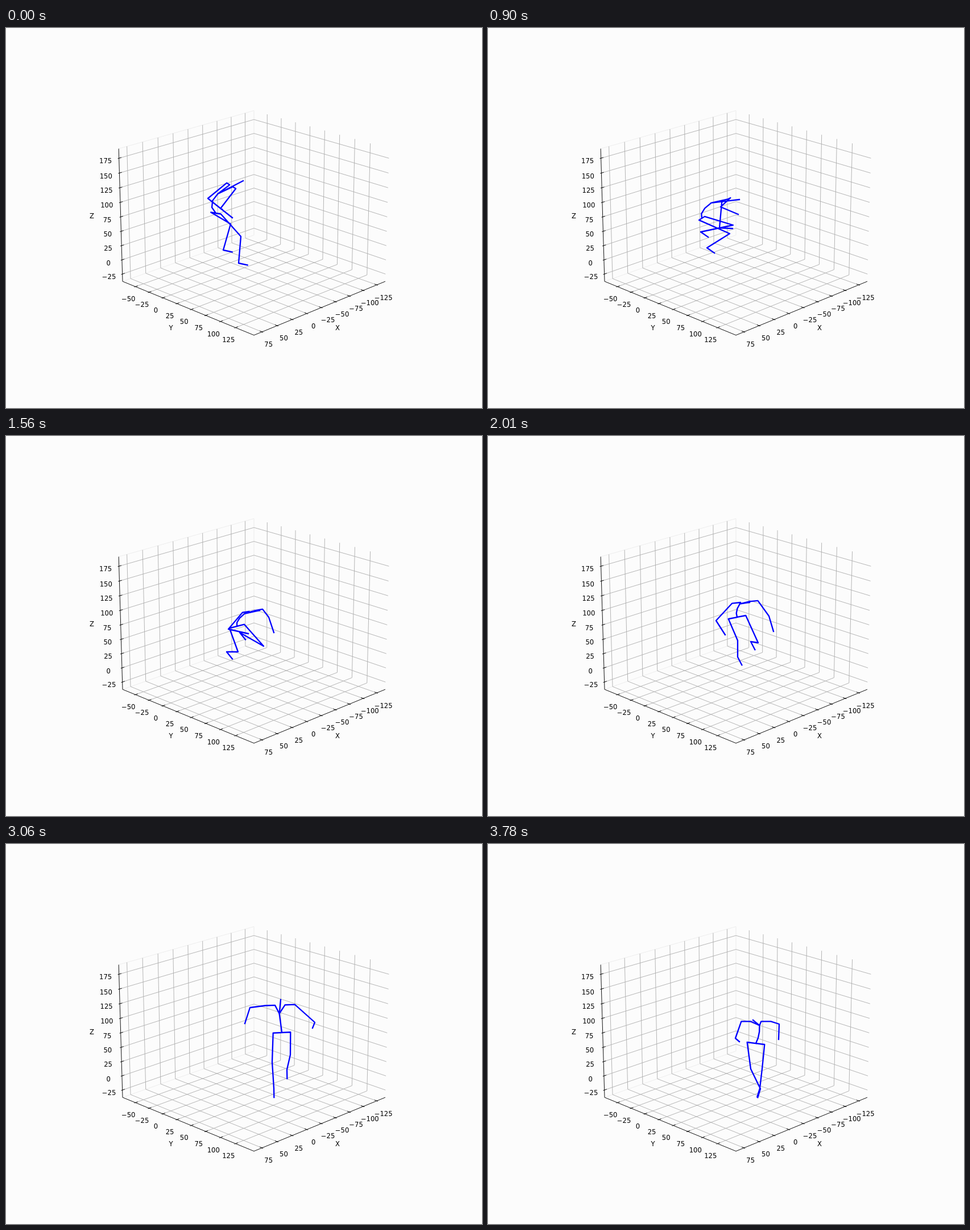
Write an HTML page that moves like this. It is 837 px wide and 669 px high and loops after 3810 ms.

```html
<!DOCTYPE html>
<html>
<head>
<meta charset="utf-8">
<style>
html, body { margin: 0; width: 100%; height: 100%; overflow: hidden; background: #fcfcfc; }
svg { display: block; }
text { font: 11.6px "DejaVu Sans", sans-serif; text-anchor: middle; fill: #000; }
path { fill: none; }
</style>
</head>
<body>
<svg width="837" height="669" viewBox="0 0 837 669">
  <path id="pane" stroke="#ececec" stroke-width="0.93"/>
  <path id="grid" stroke="#b0b0b0" stroke-width="0.93"/>
  <path id="axes" stroke="#000" stroke-width="0.93"/>
  <g id="labels"></g>
  <path id="body" stroke="#0000ff" stroke-width="2.33" stroke-linecap="square" stroke-linejoin="round"/>
</svg>
<script>
const $ = id => document.getElementById(id);
const { sin, cos, PI, min } = Math;
const rad = deg => deg * PI / 180;
const line = pts => "M" + pts.map(p => p[0].toFixed(2) + " " + p[1].toFixed(2)).join("L");

// --- axes box: camera at azimuth 45, elevation 20, distance 10 ---------
const SIDE = 8 / 7, HEIGHT = 6 / 7, ELEV = rad(20), ZOOM = 2900;

// u, v, w run 0..1 along the box edges; u and v lead from the left corner.
function project(u, v, w) {
  const across = (u + v - 1) * SIDE * Math.SQRT1_2;
  const depth = (u - v) * SIDE * Math.SQRT1_2;
  const up = (w - 0.5) * HEIGHT;
  const far = 10 + depth * cos(ELEV) - up * sin(ELEV);
  return [
    436 + ZOOM * across / far,
    331 - ZOOM * (up * cos(ELEV) + depth * sin(ELEV)) / far
  ];
}

const OUT = 0.1 / 12, IN = 0.2 / 12;
let grid = "", labels = "";
let axes = line([project(0, 0, 1), project(0, 0, 0), project(0, 1, 0), project(1, 1, 0)]);

function label(s, x, y) {
  const str = String(s).replace("-", "\u2212");
  labels += `<text x="${x.toFixed(1)}" y="${(y + 4.2).toFixed(1)}">${str}</text>`;
}

// at(f, side): axis point of a tick; mesh(f): its grid line.
function axis(from, to, frac, at, mesh, dx, dy) {
  for (let n = from; n <= to; n += 25) {
    const f = frac(n), [x, y] = at(f, 0);
    grid += line(mesh(f));
    axes += line([at(f, OUT), at(f, -IN)]);
    label(n, x + dx, y + dy);
  }
}
axis(-125, 75, n => (88 - n) / 229, (f, o) => project(f, 1 + o, 0),
  f => [project(f, 1, 0), project(f, 0, 0), project(f, 0, 1)], 11.6, 22);
axis(-50, 125, n => (n + 74) / 229, (f, o) => project(-o, f, 0),
  f => [project(0, f, 0), project(1, f, 0), project(1, f, 1)], -12.4, 21.7);
axis(-25, 175, n => (n + 38) / 229, (f, o) => project(-o, 0, f),
  f => [project(0, 0, f), project(1, 0, f), project(1, 1, f)], -23.6, 5);
label("X", 583, 527.5);
label("Y", 290, 527.5);
label("Z", 151, 331);

$("pane").setAttribute("d", line([project(0, 0, 0), project(1, 0, 0), project(1, 0, 1), project(0, 0, 1)]));
$("grid").setAttribute("d", grid);
$("axes").setAttribute("d", axes);
$("labels").innerHTML = labels;

// --- figure --------------------------------------------------------
const LOOP = 3810, STEP = 30, END = LOOP - STEP;
const keys = [0, 900, 1560, 2010, 2580, 3060, END];

// Smooth curve through one point per key time.
function track(...pts) {
  const slope = (k, c) => {
    const a = Math.max(k - 1, 0), b = min(k + 1, keys.length - 1);
    return (pts[b][c] - pts[a][c]) / (keys[b] - keys[a]);
  };
  return t => {
    let k = 0;
    while (k < keys.length - 2 && t >= keys[k + 1]) k++;
    const d = keys[k + 1] - keys[k], s = (t - keys[k]) / d, r = 1 - s;
    return [0, 1].map(c =>
      r * r * (1 + 2 * s) * pts[k][c] + s * s * (1 + 2 * r) * pts[k + 1][c] +
      d * s * r * (r * slope(k, c) - s * slope(k + 1, c)));
  };
}

const root = track([369, 326], [376, 335], [406, 335], [438, 319], [472, 310], [485, 332], [471, 351]);
const head = track([417, 269], [442, 302], [446, 307], [460, 293], [475, 278], [483, 274], [466, 310]);
const legL = {
  knee: track([413, 367], [425, 362], [408, 380], [439, 360], [460, 361], [468, 384], [462, 396]),
  ankle: track([409, 414], [385, 387], [388, 380], [439, 389], [464, 395], [471, 430], [479, 431])
};
const legR = {
  knee: track([395, 345], [431, 347], [453, 370], [475, 364], [502, 356], [500, 371], [482, 396]),
  ankle: track([382, 391], [374, 359], [411, 346], [462, 362], [499, 380], [494, 397], [478, 430])
};
const armL = {
  elbow: track([377, 318], [407, 352], [391, 340], [401, 325], [428, 293], [429, 288], [435, 342]),
  wrist: track([380, 319], [430, 353], [426, 348], [417, 350], [438, 315], [420, 316], [442, 348])
};
const armR = {
  elbow: track([355, 300], [409, 315], [462, 319], [494, 317], [509, 287], [543, 314], [512, 317]),
  wrist: track([398, 334], [440, 328], [471, 346], [502, 344], [516, 314], [539, 324], [511, 344])
};

const add = (p, q, m = 1) => [p[0] + q[0] * m, p[1] + q[1] * m];

// Arc that is zero outside a..b.
const bump = (t, a, b) => t > a && t < b ? sin(PI * (t - a) / (b - a)) ** 2 : 0;

function draw(t) {
  const s = t / END, sway = 2.3 * PI * s;
  const hub = root(t), top = head(t);

  // The torso leans, rises and slowly uncurls.
  const chest = add(hub, [9 - 6 * s + 10 * cos(sway - rad(124)), -28 - 6 * cos(sway)]);
  const bend = 10 * s - 8, trunk = add(chest, hub, -1);
  const spine = [0.3, 0.65].map(m => add(add(hub, trunk, m), [bend, 0]));
  const neckLine = add(top, chest, -1);
  const neck = add(chest, neckLine, 0.72);

  // Hips and shoulders turn until they face the camera.
  const hip = [15.3 * sin(rad(min(90, 0.06 * t - 35))), 13.5 * s * s - 10 * s - 1.5];
  const girdle = [26 * sin(rad(min(90, 0.039 * t - 18))), 5 * s - 5];
  const collar = add(add(chest, neckLine, 0.53), [0, -2]);
  const turn = rad(12 + 95 * s), foot = [16 * cos(turn), 16 * sin(turn)];

  const leg = (l, side) => {
    const ankle = l.ankle(t);
    return [hub, add(hub, hip, side), l.knee(t), ankle, add(ankle, foot)];
  };
  const arm = (a, side) =>
    [chest, add(collar, girdle, side * 0.34), add(collar, girdle, side), a.elbow(t), a.wrist(t)];

  const drop = 6 * bump(t, 900, 1560) + 8 * bump(t, 3060, END) -
    20 * bump(t, 0, 900) - 4 * bump(t, 2580, 3060);
  const parts = [
    [hub, ...spine, chest, neck, top],
    leg(legL, -1), leg(legR, 1), arm(armL, -1), arm(armR, 1)
  ];
  $("body").setAttribute("d", parts.map(p => line(p.map(q => add(q, [0, drop])))).join(""));
}

const start = performance.now();
function tick() {
  const t = (performance.now() - start) % LOOP;
  draw(Math.floor(t / STEP) * STEP);
  requestAnimationFrame(tick);
}
draw(0);
requestAnimationFrame(tick);
</script>
</body>
</html>
```
